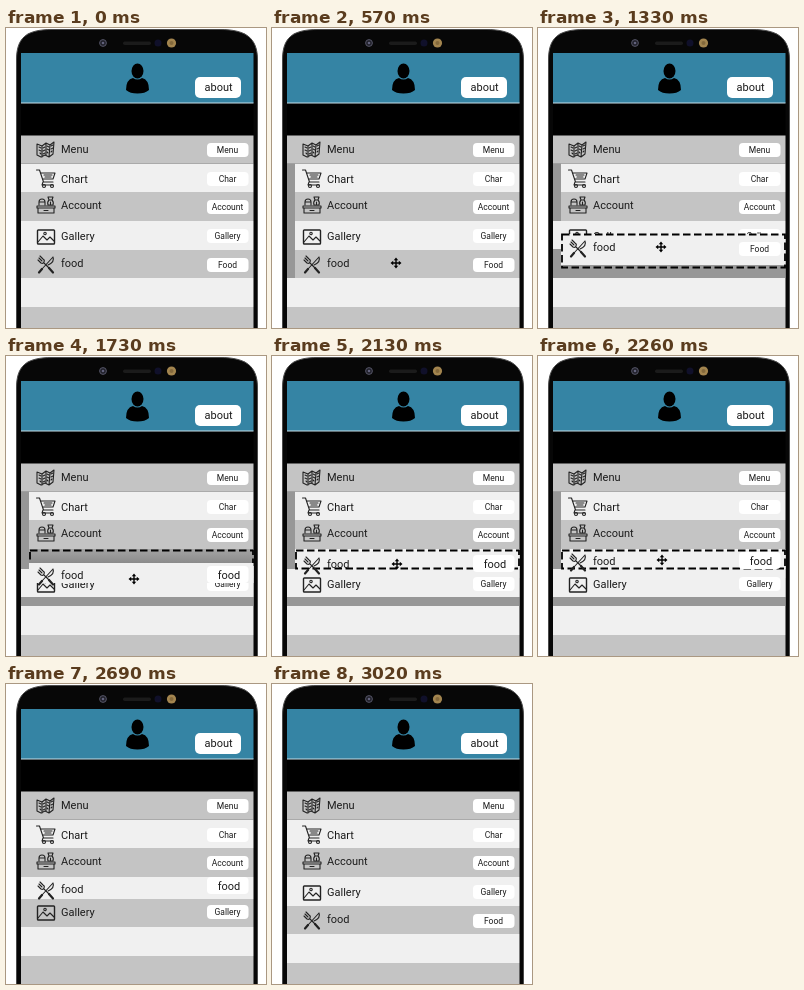
An HTML page that plays this animation: 260x300 px, repeating every 3320 ms.

```html
<!DOCTYPE html>
<html lang="en">
<head>
<meta charset="utf-8">
<style>
  html, body { margin: 0; width: 100%; height: 100%; overflow: hidden; background: #fff; }
  svg { display: block; width: 260px; height: 300px; font-family: Roboto, Arial, sans-serif; }
  .label { font-size: 11px; fill: #1c1c1c; }
  .tag { font-size: 8.5px; fill: #1c1c1c; text-anchor: middle; }
  .tag.big { font-size: 11px; }
  .line { fill: none; stroke: #222; stroke-width: 1.1; stroke-linecap: round; stroke-linejoin: round; }
</style>
</head>
<body>
<svg viewBox="0 0 260 300">
  <defs>
    <linearGradient id="shade" x2="0" y2="1">
      <stop stop-color="#a4a4a4"/><stop offset="1" stop-color="#8b8b8b"/>
    </linearGradient>
    <g id="menu" class="line" stroke-width=".9">
      <path d="M-9-5l5 2 4-3 4 2 4-3-1 12-4 3-4-2-4 2-4-2zM-4-3V8M0-6V6M4-4L3 8"/>
      <path d="M-7-2l2 1M-7 1l2 1M-6 4l1 1M-3-1l2-1M-3 2l2-1M-3 5l2-1M1-3l2 1M1 0l2 1M1 3l1 1M5-3l2-1M5 0l2-1M5 3l1-1"/>
    </g>
    <g id="chart" class="line">
      <path d="M-9.500-9h3l4 12H7M-5.500-6H9L7 0H-3.500M-2-4H6M-1-2H5M-3 3l-1 3H7"/>
      <circle cx="-2" cy="7" r="1.500"/><circle cx="6" cy="7" r="1.500"/>
    </g>
    <g id="account" class="line">
      <path d="M-9 1H9V3H-9zM-8 3V8H8V3M-2 5.500H2"/>
      <path d="M-7 0V-3q0-3 3-3t3 3V0M-6-3h4M2 0q-1-3 1-5h3q2 2 1 5zM3-5l-1-3h5l-1 3M4.500-3v2"/>
    </g>
    <g id="gallery" class="line">
      <rect x="-8.500" y="-7" width="17" height="14" rx=".8" stroke-width="1.400"/>
      <path d="M-8 5l5-6 4 4 3-3 4 4"/><circle cx="-1" cy="-3.500" r="1.200"/>
    </g>
    <g id="food" class="line">
      <path d="M7-8L-4 4M7-8Q9-3 2 0"/><path d="M-4 4l-3 3.500" stroke-width="2.200"/>
      <path d="M-2-2L3 3"/><path d="M3 3l4 4.500" stroke-width="2.200"/>
      <path d="M-8-5l3 3q2 1 3-1t-1-3l-3-3M-7-7l3 3"/>
    </g>
    <g id="move">
      <path d="M-4 0H4M0-4V4" stroke="#000" stroke-width="1.400"/>
      <path d="M0-5.500l2.200 2.700h-4.400zM0 5.500l2.200-2.700h-4.400zM-5.500 0l2.700-2.200v4.400zM5.500 0l-2.700-2.200v4.400z"/>
    </g>
  </defs>

  <path d="M10.500 301V32C10.500 10 20 1.500 46 1.500H214C240 1.500 251.500 10 251.500 32V301z" fill="#070707" stroke="#4a4a4a"/>
  <path d="M15 25H247.500V75H15z" fill="#3584a4"/>
  <path d="M15 75H247.500" stroke="#c4dce6"/>
  <circle cx="97" cy="15" r="3.400" fill="#20202a" stroke="#555566"/><circle cx="97" cy="15" r="1.300" fill="#62627c"/>
  <rect x="117" y="13.500" width="28" height="3.500" rx="1.700" fill="#1b1b1b"/>
  <circle cx="152" cy="15" r="3.500" fill="#10102a"/>
  <circle cx="165.500" cy="15" r="4.600" fill="#a3854f"/><circle cx="165.500" cy="15" r="2" fill="#84693c"/>
  <ellipse cx="131.500" cy="43" rx="6" ry="7.500"/>
  <path d="M120 62Q120 51.500 127 50Q131.500 53 136 50Q143 51.500 143 62Q139 65.500 131.500 65.500T120 62z"/>
  <rect x="189" y="49" width="46" height="21" rx="5" fill="#fff"/>
  <text class="label" x="198.500" y="63">about</text>
  <g id="list"></g>
</svg>
<script>
const LOOP = 3320;
const GREY = '#c4c4c4', LIGHT = '#f0f0f0', DARK = '#979797';
const list = document.getElementById('list');

const rect = (x, y, x2, y2, fill) =>
  `<rect x="${x}" y="${y}" width="${x2 - x}" height="${y2 - y}" fill="${fill}"/>`;

function item(icon, label, tag, y, tagY = y, iconY = y, big = false) {
  const top = big ? tagY - 10 : tagY - 7;
  return `<use href="#${icon}" x="40" y="${iconY}"/>
    <text class="label" x="55" y="${y + 4}">${label}</text>
    <rect x="201" y="${top}" width="41.5" height="${tagY + 7 - top}" rx="4" fill="#fff"/>
    <text class="tag ${big ? 'big' : ''}" x="${big ? 223 : 221.5}" y="${tagY + 3}">${tag}</text>`;
}

const dashes = (y, y2) => `<path d="M24 ${y}H247V${y2}H24z"
  fill="none" stroke="#000" stroke-width="1.8" stroke-dasharray="7.5 3.5"/>`;

// Row edges below the fixed rows, for the resting and the reordered list
const REST = [193, 222, 250, 279], SWAPPED = [193, 215, 243, 272];

const rest = { edges: REST, food: 235, gallery: 208 };
const hover = { ...rest, strip: 250 };
const lift = { ...hover, cursor: [124, 235], panel: [222, 250], box: [223, 250] };
const over = { ...rest, strip: 193, band: [221, 250], food: 219, cursor: [123, 219],
  panel: [206, 237], box: [206.5, 239.5] };
const shifted = { ...rest, strip: 213, band: [241, 250], slot: [193, 207], row: [207, 241],
  food: 219, gallery: 228, panel: [207, 227], box: [194.5, 212.5], big: true, cursor: [128, 223] };
const near = { ...shifted, slot: [193, 201], row: [201, 241], panel: [201, 222],
  food: 212, cursor: [126, 214] };
const drop = { ...shifted, slot: null, row: [193, 241], panel: [193, 213], boxOnTop: true,
  food: 205, cursor: [124, 204] };
const swapped = { edges: SWAPPED, strip: 215, food: 205, foodTag: 203, gallery: 228, big: true };
over.boxOnTop = lift.boxOnTop = true;

const steps = [
  [0, rest], [470, hover], [570, { ...hover, cursor: [124, 235] }],
  [900, { ...lift, panel: null }], [1000, lift],
  [1330, over], [1430, { ...over, cursor: [128, 223] }],
  [1730, shifted], [1830, near],
  [2130, { ...drop, food: 208, cursor: [125, 208] }], [2260, drop],
  [2560, swapped], [2690, { ...swapped, strip: 0 }],
  [2920, rest]
];

function draw(s) {
  const edges = [107.5, 135.5, 164, ...s.edges, 300];
  const span = (r, fill, x = 15) => r ? rect(x, r[0], 247.5, r[1], fill) : '';
  const box = s.box ? dashes(...s.box) : '';
  const { foodTag = s.food + (s.big ? 1 : 2) } = s;
  let out = rect(15, 76, 247.5, 107.5, '#000');
  for (let i = 0; i < edges.length - 1; i++)
    out += span([edges[i], edges[i + 1]], i % 2 ? LIGHT : GREY);
  out += span(s.band, DARK) + span(s.slot, 'url(#shade)') + span(s.row, LIGHT);
  if (s.strip) out += rect(15, 135.5, 23, s.strip, DARK);
  out += item('menu', 'Menu', 'Menu', 121, 122)
    + item('chart', 'Chart', 'Char', 151)
    + item('account', 'Account', 'Account', 177, 179)
    + item('gallery', 'Gallery', 'Gallery', s.gallery, s.gallery, s.gallery + 1);
  const panel = span(s.panel, LIGHT, 23);
  out += s.boxOnTop ? panel + box : box + panel;
  out += item('food', 'food', s.big ? 'food' : 'Food', s.food, foodTag, s.food + 2, s.big);
  if (s.cursor) out += `<use href="#move" x="${s.cursor[0]}" y="${s.cursor[1]}"/>`;
  list.innerHTML = out;
}

let shown;
function tick() {
  const t = performance.now() % LOOP;
  const state = steps.findLast(([start]) => start <= t)[1];
  if (state !== shown) draw(shown = state);
  requestAnimationFrame(tick);
}
tick();
</script>
</body>
</html>
```
